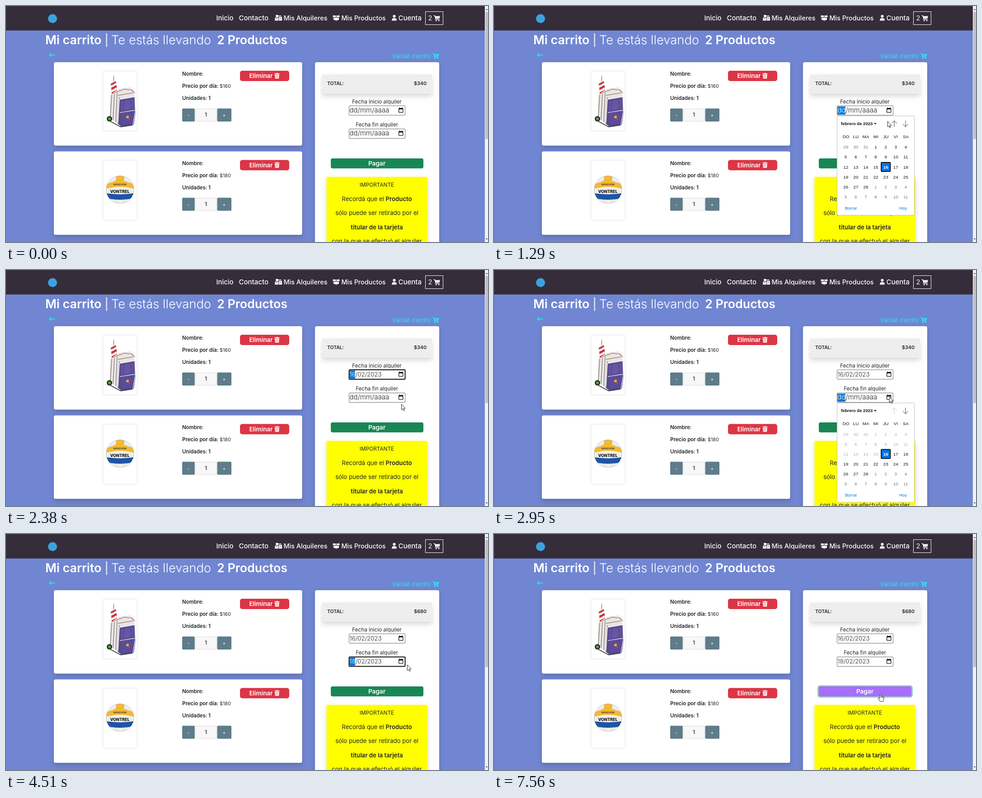
Recreate the animation shown at these times as an HTML page. Size 1067 by 525 pixels, loop 8 s.

```html
<!DOCTYPE html>
<html lang="es">
<head>
<meta charset="utf-8">
<title>Mi carrito</title>
<style>
  html, body { margin: 0; width: 100%; height: 100%; overflow: hidden; background: #7186d2; }
  svg { display: block; width: 1067px; height: 525px; }
  text { font-family: Inter, "Open Sans", sans-serif; white-space: pre; }
  .cal text { font-family: "Liberation Sans", Arial, sans-serif; }
  .card { filter: drop-shadow(0 5px 6px rgba(0, 0, 0, .16)); }
  .raised { filter: drop-shadow(0 6px 6px rgba(0, 0, 0, .15)); }
</style>
</head>
<body>
<svg id="stage" viewBox="0 0 1067 525" xmlns="http://www.w3.org/2000/svg"></svg>
<script>
const LOOP = 8000;
const stage = document.getElementById('stage');

const text = (x, y, s, size, fill = '#212529', weight = 400, anchor = 'start') =>
  `<text x="${x}" y="${y}" font-size="${size}" fill="${fill}" font-weight="${weight}" text-anchor="${anchor}">${s}</text>`;
const rect = (x, y, w, h, fill, r = 0, extra = '') =>
  `<rect x="${x}" y="${y}" width="${w}" height="${h}" rx="${r}" fill="${fill}" ${extra}/>`;
const path = (d, fill, extra = '') => `<path d="${d}" fill="${fill}" ${extra}/>`;
const line = (d, stroke, width = 1) =>
  path(d, 'none', `stroke="${stroke}" stroke-width="${width}" stroke-linecap="round" stroke-linejoin="round"`);
const circle = (x, y, r, fill, extra = '') => `<circle cx="${x}" cy="${y}" r="${r}" fill="${fill}" ${extra}/>`;
const at = (x, y, content) => `<g transform="translate(${x} ${y})">${content}</g>`;

const cartIcon = (x, y, color, mark = '') => at(x, y,
  line('M.7 1H2.8L4.8 9.2H12.6', color, 1.4) + path('M3.2 2H14.4L12.8 7.6H4.4Z', color) +
  circle(5.6, 11.8, 1.4, color) + circle(11.6, 11.8, 1.4, color) + mark);

const trashIcon = (x, y) => at(x, y,
  rect(0, 1, 11.4, 1.6, '#fff', .5) + rect(3.6, 0, 4.2, 1.6, '#fff', .5) +
  path('M.9 3.4H10.5L9.9 11.4Q9.8 12.4 8.8 12.4H2.6Q1.6 12.4 1.5 11.4Z', '#fff') +
  line('M3.7 5.2V10.6M5.7 5.2V10.6M7.7 5.2V10.6', '#dc3545', .6));

function header() {
  const w = '#fff';
  const boxes = at(595, 20,
    rect(0, 6, 8, 6.5, w, 1) + rect(2, 0, 6, 4.8, w, .6) + rect(9, 4, 7, 8.5, w, .8) +
    line('M9 2H14', w, 1.4) + line('M1.5 8.6H5M10.8 7H14', '#352d39', 1));
  const openBox = at(723, 20,
    path('M1.6 .6L8 1.8L14.4 .6L16 4.2L10.2 5.8L8 2.6L5.8 5.8L0 4.2Z', w) +
    path('M2 5.8L6.2 7L8 4.6L9.8 7L14 5.8V10.6L8 12.4L2 10.6Z', w));
  const person = circle(859.5, 22.8, 3.1, w) + path('M854 32.6Q854 27 858 27H861Q865 27 865 32.6Z', w);
  return rect(0, 0, 1060, 54.5, '#352d39') + circle(103, 28, 10, '#3ca2dd') +
    text(465.5, 32, 'Inicio', 14.8, w, 450) + text(515.5, 32, 'Contacto', 15, w, 450) +
    boxes + text(614.5, 32, 'Mis Alquileres', 14.4, w, 450) +
    openBox + text(742.5, 32, 'Mis Productos', 14.3, w, 450) +
    person + text(868.5, 32, 'Cuenta', 15, w, 450) +
    rect(928.5, 12.5, 39, 29, 'none', 0, 'stroke="#fff"') +
    text(934.5, 32, '2', 14.5, w) + cartIcon(946.5, 20.5, w);
}

function titleRow() {
  const cyan = '#1cecf8';
  return text(87, 85, 'Mi carrito', 26.9, '#fff', 600) + text(218.5, 85, '|', 25, '#fff', 400) +
    text(233, 85, 'Te estás llevando', 27.4, '#fff', 350) +
    text(467, 85, '2 Productos', 26.8, '#fff', 600) +
    line('M97 109H108.5M100 106L96.6 109L100 112', cyan, 1.7) +
    text(855, 116, 'Vaciar carrito', 13.5, cyan) +
    cartIcon(944, 105, cyan, line('M8.6 3V6.4M7 4.7H10.3', '#7186d2', 1));
}

function trolley() {
  return line('M238.5 156V167', '#555', 1) +
    path('M231.5 171L243.5 165L247 196L233 198Z', '#f3eeee') +
    path('M232 173L243 167L243.6 171L232.6 177ZM233 182L244.6 176L245.2 181L233.6 187ZM234 192L246 186L246.6 191L234.4 197Z', '#c8323c') +
    path('M231 197L250 184L277 181L284 191L286 236L254 268L229 249Z', '#e9e6e4') +
    line('M234 198L231 246M240 196L237 252M246 194L243 257M251 203L248 262', '#77706f', 1.2) +
    line('M235 195L262 185L279 187L284 193M248 199L281 193', '#8d5f55', 1.2) +
    circle(229, 251, 6, '#26282a') + circle(229, 251, 3.2, '#5aa03c') +
    path('M251 208L285 202L287 236L283 264L256 269L247 261Z', '#54478f') +
    path('M254 212L281 207L282 229L254 234Z', '#6757a3') +
    path('M254 239L282 234L279 261L257 265Z', '#5a4c98') +
    line('M251 208L285 202L286 235L281 264M251 208L248 260M253 237L284 232', '#eeeaf0', 1.4) +
    line('M260 211L259 234M276 208L277 230', '#3c3273', .8) +
    circle(269, 247, 3.2, '#d8a35a') + circle(272, 251, 2.2, '#bb4551') +
    line('M230 256L254 269L280 265', '#333', 1.5);
}

function ball() {
  return `<clipPath id="ball"><circle cx="252.5" cy="408.5" r="31"/></clipPath>
    <g clip-path="url(#ball)">` +
    rect(221, 377, 63, 63, '#eeeeec') +
    path('M245 376H262L261 389L285 397V407Q252 397 220 407V397L243 389Z', '#f5b92f') +
    path('M220 416Q252 422 285 416V427Q252 435 220 427Z', '#1f55a5') +
    line('M245 377L243 389L223 396M262 377L261 389L282 396M243 432L247 440M262 432L259 440', '#c5c2bc', .8) + '</g>' +
    circle(252.5, 408.5, 30.8, 'none', 'stroke="#b9b9b5" stroke-width=".7"') +
    text(252, 398.5, 'SUPER EXTRA', 4.3, '#333', 700, 'middle') +
    text(252, 415.5, 'VONTREL', 9, '#151515', 800, 'middle');
}

function product(y, price, picture) {
  const slate = '#5f7c8a';
  return rect(106, y, 549.5, 185.5, '#fff', 4, 'class="card"') +
    rect(214.5, y + 19.5, 76, 133.5, '#fff', 3, 'stroke="#dee2e6"') + picture +
    text(390, y + 30, 'Nombre:', 11.3, '#212529', 600) +
    text(390, y + 57, 'Precio por día:', 11.5, '#212529', 600) + text(473, y + 57, price, 10.8) +
    text(390, y + 84, 'Unidades: 1', 11.3, '#212529', 600) +
    rect(390, y + 103, 27.8, 29, slate, 2) + text(404, y + 122, '-', 11, '#fff', 400, 'middle') +
    rect(419.5, y + 103.5, 46.5, 28, '#f8f8f8', 1, 'stroke="#ddd"') +
    text(442.5, y + 121, '1', 12, '#444', 600, 'middle') +
    rect(467.5, y + 103, 31.5, 29, slate, 2) + text(483, y + 122, '+', 11, '#fff', 400, 'middle') +
    rect(518, y + 19, 109, 23, '#dc3545', 5) +
    text(538.5, y + 35, 'Eliminar', 13.4, '#fff', 600) + trashIcon(594.3, y + 24);
}

function summary() {
  const mid = (y, s, size, weight) => text(821, y, s, size, '#212529', weight, 'middle');
  return rect(684, 125, 275, 420, '#fff', 4, 'class="card"') +
    rect(700, 152.5, 243, 42.5, '#efeded', 0, 'class="raised"') +
    text(711, 176, 'TOTAL:', 10.4, '#212529', 600) +
    mid(217, 'Fecha inicio alquiler', 11.7) + mid(268, 'Fecha fin alquiler', 11.6) +
    rect(709.5, 380, 224, 160, '#ff0', 0, 'class="raised"') +
    mid(402, 'IMPORTANTE', 11.8) +
    mid(433.5, 'Recordá que el <tspan font-weight="600">Producto</tspan>', 13.2) +
    mid(465, 'sólo puede ser retirado por el', 13.2) +
    mid(496.5, 'titular de la tarjeta', 13.2, 600) +
    mid(528, 'con la que se efectuó el alquiler', 13.3);
}

const scrollbar = () => rect(1060, 0, 7, 525, '#f1f1f1') + rect(1061, 13, 6, 283, '#c1c1c1') +
  path('M1061.5 9L1064 6L1066.5 9Z', '#606060') + path('M1061.5 517L1064 520L1066.5 517Z', '#606060');

// y: top edge; selected: day part marked; ring: strong focus outline
function dateField(y, value, selected, ring) {
  const [day, ...rest] = value.split('/');
  const empty = day === 'dd';
  return rect(759.5, y + .5, 124, 21, '#fff', 1.5,
      ring ? 'stroke="#101010" stroke-width="2"' : 'stroke="#6b6b6b"') +
    (selected ? rect(760.5, y + 2, empty ? 17.5 : 12.5, 18, '#0078d7') : '') +
    text(760.5, y + 15.2, `<tspan fill="${selected ? '#fff' : '#222'}">${day}</tspan>/${rest.join('/')}`,
      empty ? 15 : 13.2, '#222', 350) +
    rect(869.7, y + 6.2, 9, 9, 'none', 1, 'stroke="#111" stroke-width="1.3"') +
    rect(869.5, y + 5.6, 9.4, 2.8, '#111') + line(`M871.6 ${y + 4.6}V${y + 6}M876.8 ${y + 4.6}V${y + 6}`, '#111', 1.2);
}

const COL = 22.1;
function calendar(y, firstEnabled, pointer) {
  const mid = (x, yy, s, fill, weight) => text(x, yy, s, 9.8, fill, weight, 'middle');
  const arrow = (x, dir, color) => line(
    `M${x} ${y + 11.5}V${y + 24.5}M${x - 5.5} ${y + 18 + dir}L${x} ${y + 18 + 6.5 * dir}L${x + 5.5} ${y + 18 + dir}`, color, .9);
  let out = rect(759.5, y + .5, 171, 221, '#fff', 1, 'stroke="#bfbfbf"') +
    text(768, y + 20.8, 'febrero de 2023', 9.5, '#111', 700) + path(`M841 ${y + 16.3}H847L844 ${y + 19.6}Z`, '#111') +
    arrow(886, -1, firstEnabled > 1 ? '#c4c4c4' : '#222') + arrow(911, 1, '#222');
  'DO LU MA MI JU VI SA'.split(' ').forEach((d, i) => { out += mid(779 + i * COL, y + 50, d, '#111'); });
  for (let i = 0; i < 42; i++) {
    const n = i - 2;
    const cx = 778.8 + (i % 7) * COL, cy = y + 69.7 + Math.floor(i / 7) * COL;
    const label = n < 1 ? n + 31 : n > 28 ? n - 28 : n;
    const enabled = n >= firstEnabled;
    const hovered = Math.abs(pointer.x - cx) < 11 && Math.abs(pointer.y - cy) < 11;
    if (n === 16) {
      out += rect(cx - 10, cy - 10, 20, 20, '#0078f5', 1, 'stroke="#101010" stroke-width="2"') +
        mid(cx, cy + 3.6, label, '#fff', 700);
      continue;
    }
    if (hovered && enabled) out += rect(cx - 10.5, cy - 10.5, 21, 21, '#cce3ff', 1);
    const color = !enabled ? '#b0b0b0' : n < 1 || n > 28 ? '#757575' : '#111';
    out += mid(cx, cy + 3.6, label, color);
  }
  return `<g class="cal">${out}${text(777, y + 208.5, 'Borrar', 9.5, '#0075d9')}${text(897, y + 208.5, 'Hoy', 9.5, '#0075d9')}</g>`;
}

function payButton(hover, focus) {
  return (focus ? rect(716, 336.5, 211, 27.5, '#9dccb6', 6) : '') +
    rect(719, 339, 205, 22.3, hover ? '#a66dff' : '#198754', 4) +
    text(821, 354.6, 'Pagar', 13.6, '#fff', 600, 'middle');
}

const outline = 'stroke="#111" stroke-width=".9" stroke-linejoin="round"';
const arrowCursor = path('M.3 .3V12.6L3 10.1L4.9 14.6L6.9 13.7L5 9.4H8.8Z', '#fff', outline);
const handCursor = path('M-1.3 1.2Q0 -.6 1.3 1.2V6Q3.2 5 3.8 6.5Q5.6 5.7 6.1 7.2Q8 6.8 8 8.8V12.5L6.4 17.5H-.2L-4 11.8Q-4.6 9.6 -2.6 9.8L-1.3 11.2Z', '#fff', outline) +
  line('M1.3 6V9M3.8 6.6V9.4M6.1 7.2V9.8', '#111', .7);

// time, x, y of the pointer
const TRACK = [
  [70, 1011, 513], [200, 975, 450], [340, 925, 372], [430, 893, 345], [560, 870, 250], [640, 864, 196],
  [740, 862, 215], [820, 863, 234], [1000, 873, 231], [1150, 873, 231], [1300, 871, 258], [1480, 868, 325],
  [1630, 866, 357], [1770, 867, 351], [1990, 867, 352], [2140, 869, 331], [2450, 877, 289], [2730, 875, 282],
  [2950, 875, 282], [3300, 890, 340], [3640, 912, 407], [4060, 912, 405], [4250, 903, 368], [4350, 896, 335],
  [4510, 888, 291], [4720, 899, 276], [4900, 902, 261], [5050, 897, 271], [6300, 897, 271], [6370, 889, 295],
  [6580, 854, 356], [7555, 854, 356], [7560, 855, 355]
];

function pointerAt(t) {
  const next = TRACK.findIndex(k => k[0] > t);
  if (next < 0) { const [, x, y] = TRACK[TRACK.length - 1]; return { x, y }; }
  const [t0, x0, y0] = TRACK[Math.max(next - 1, 0)], [t1, x1, y1] = TRACK[next];
  const p = Math.max(0, (t - t0) / (t1 - t0));
  return { x: x0 + (x1 - x0) * p, y: y0 + (y1 - y0) * p };
}

stage.innerHTML = rect(0, 0, 1067, 525, '#7186d2') + header() + titleRow() +
  product(125, '$160', trolley()) + product(323.5, '$180', ball()) + summary() + scrollbar() + '<g id="live"></g>';
const live = document.getElementById('live');

function draw(t) {
  const during = (a, b) => t >= a && t < b;
  const pointer = pointerAt(t);
  const startOpen = during(1090, 2140), endOpen = during(2880, 4060);
  const startSet = t >= 2140, endSet = t >= 4060;
  const hover = !startOpen && !endOpen && pointer.x > 719 && pointer.x < 924 && pointer.y > 339 && pointer.y < 361.5;
  live.innerHTML =
    text(931, 176, endSet ? '$680' : '$340', 10.7, '#212529', 600, 'end') +
    dateField(221.5, startSet ? '16/02/2023' : 'dd/mm/aaaa', during(1020, 2700), during(2140, 2700)) +
    dateField(273, endSet ? '18/02/2023' : 'dd/mm/aaaa', during(2700, 4850), during(4060, 4850)) +
    payButton(hover, t >= 7040) +
    (startOpen ? calendar(244, -Infinity, pointer) : '') +
    (endOpen ? calendar(295.3, 16, pointer) : '') +
    (t >= 70 ? at(pointer.x, pointer.y, hover ? handCursor : arrowCursor) : '');
}

function tick() {
  draw(performance.now() % LOOP);
  requestAnimationFrame(tick);
}
tick();
</script>
</body>
</html>
```
